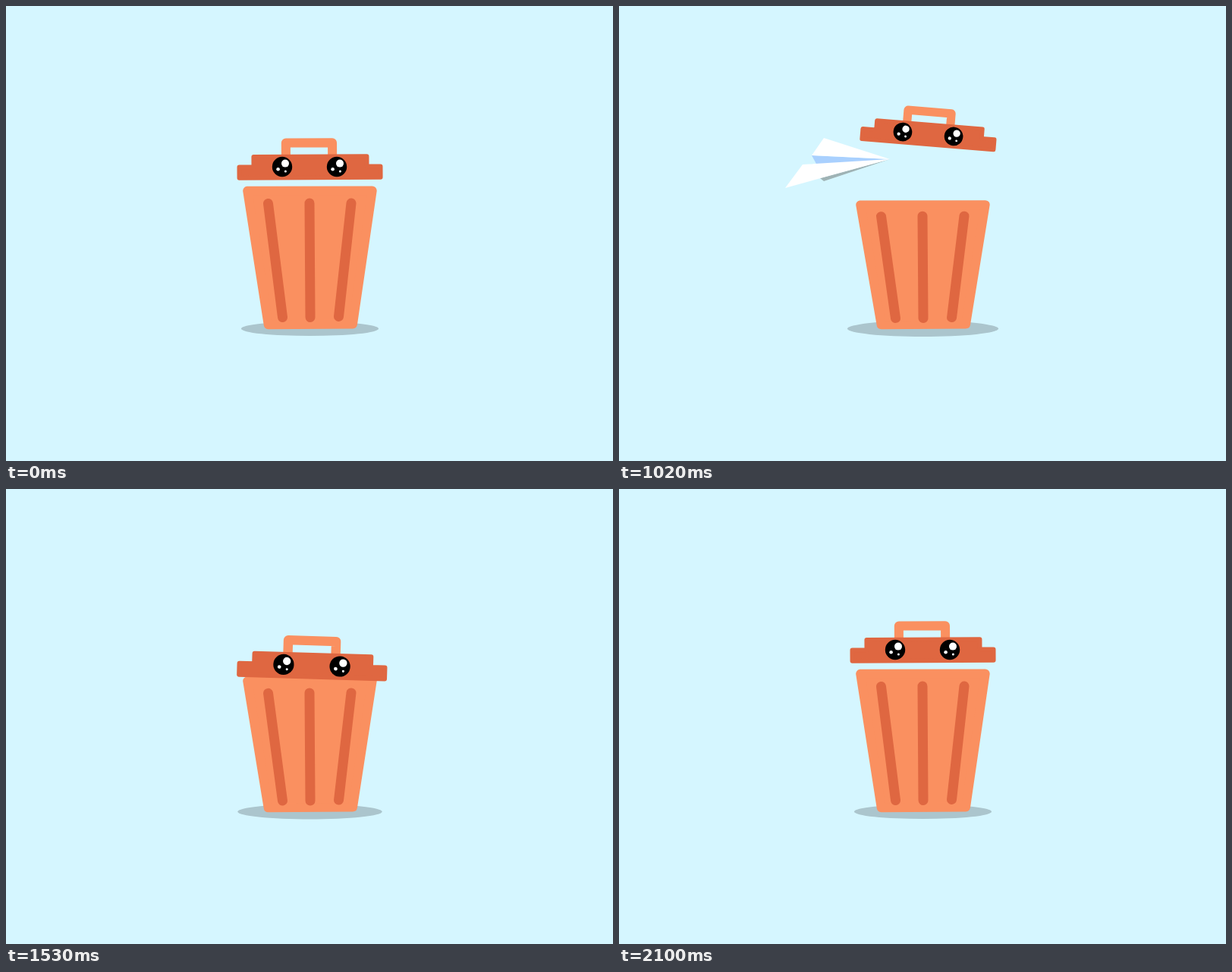
Recreate the animation shown at these times as an HTML page. Size 800 by 600 pixels, loop 2700 ms.

```html
<!DOCTYPE html>
<html lang="en">
<head>
<meta charset="utf-8">
<title>Hungry bin</title>
<style>
  html, body { margin: 0; width: 100%; height: 100%; overflow: hidden; background: #d5f6ff; }
  svg { display: block; width: 800px; height: 600px; }
  .light { fill: #fa9060; stroke: #fa9060; stroke-linejoin: round; }
  .dark { fill: #df6741; stroke: #df6741; stroke-linejoin: round; stroke-linecap: round; }
</style>
</head>
<body>
<svg viewBox="0 0 800 600">
  <defs>
    <g id="eye">
      <circle r="13.2"/>
      <g fill="#fff">
        <circle cx="4" cy="-4.4" r="5"/>
        <circle cx="-5.4" cy="3.2" r="2.3"/>
        <circle cx="4.4" cy="6" r="1.5"/>
      </g>
    </g>
  </defs>

  <ellipse id="shadow" rx="90.5" ry="9.5" fill="#abc5cd"/>

  <!-- paper plane, nose at the origin -->
  <g id="plane">
    <path fill="#9fb3b5" d="M0 0L-92 25L-87 29Z"/>
    <path fill="#a9d0fe" d="M0 0L-103 -5L-96 8Z"/>
    <path fill="#fff" d="M0 0L-87 -28L-103 -5ZM0 0L-115 7L-138 38Z"/>
  </g>

  <!-- body, middle of its base at the origin -->
  <g id="body">
    <path class="light" stroke-width="12" d="M-82.3 -182.3L82.2 -182.6L56.5 -6.6L-54.8 -5.8Z"/>
    <path class="dark" fill="none" stroke-width="13" d="M-55 -165.5L-36 -15.5M-.5 -166L.5 -15.5M54.5 -166L38 -16.5"/>
  </g>

  <!-- lid, middle of the eyes at the origin -->
  <g id="lid">
    <g transform="rotate(-.3)">
      <path class="light" style="fill:none" stroke-width="12" d="M-31 -14V-31.6H30.2V-14"/>
      <path class="dark" stroke-width="6" d="M-73.5 -13.3H75.5V0H93.5V14.3H-92.5V0H-73.5Z"/>
    </g>
    <use href="#eye" x="-36"/>
    <use href="#eye" x="36"/>
  </g>
</svg>

<script>
const LOOP = 2700, STEP = 30;
const ENTER = 780, OPEN = 840, WIDE = 1020, GONE = 1140, CALM = 1770;

const clamp = u => Math.min(1, Math.max(0, u));
const ease = u => (1 - Math.cos(Math.PI * clamp(u))) / 2;

// Eases from one [time, value] turning point to the next, starting at rest.
function follow(t, turns) {
  let value = 0, from = OPEN;
  for (const [time, next] of turns) {
    value += (next - value) * ease((t - from) / (time - from));
    if (t < time) break;
    from = time;
  }
  return value;
}

function place(id, x, y, angle = 0, w = 1, h = w) {
  document.getElementById(id).setAttribute('transform',
    `translate(${x} ${y}) rotate(${angle}) scale(${w} ${h})`);
}

function drawBin(t) {
  // The lid bites twice, then settles.
  const drop = follow(t, [[WIDE, -43], [1170, 10], [1380, -32], [1530, 20.7], [1650, 0], [CALM, 5.2], [2100, 0]]);
  const squash = follow(t, [[WIDE, .1], [1290, -.043], [1400, .11], [1650, 0]]);

  // Damped sideways swing
  const fade = ease((t - OPEN) / (WIDE - OPEN)) * clamp((CALM - t) / (CALM - WIDE)) ** .8;
  const swing = Math.cos(Math.PI * (t - WIDE) / 258);

  place('lid', 400 + 7.5 * fade * swing, 212 + drop, fade * (3 * swing + 2), 1 + .0015 * drop);
  const narrow = Math.min(squash, 0);
  place('body', 400.5, 426 - 30 * narrow, 0, 1 + narrow, 1 - Math.max(squash, -squash / 2));
  place('shadow', 400.5, 425.5, 0, 1 + squash);
}

function drawPlane(t) {
  const u = (t - ENTER) / (WIDE - ENTER);
  const dive = Math.max(0, u - 1) ** 2;
  place('plane',
    30 + 327 * u - 464 * dive,
    60 + 172 * u - 30 * u * u + 620 * dive,
    32 * (1 - u) + 408 * dive);
  document.getElementById('plane').style.display = t >= ENTER && t <= GONE ? '' : 'none';
}

const start = performance.now();
function tick() {
  const now = (performance.now() - start) % LOOP;
  const t = Math.floor(now / STEP) * STEP;
  drawBin(t);
  drawPlane(t);
  requestAnimationFrame(tick);
}
tick();
</script>
</body>
</html>
```
